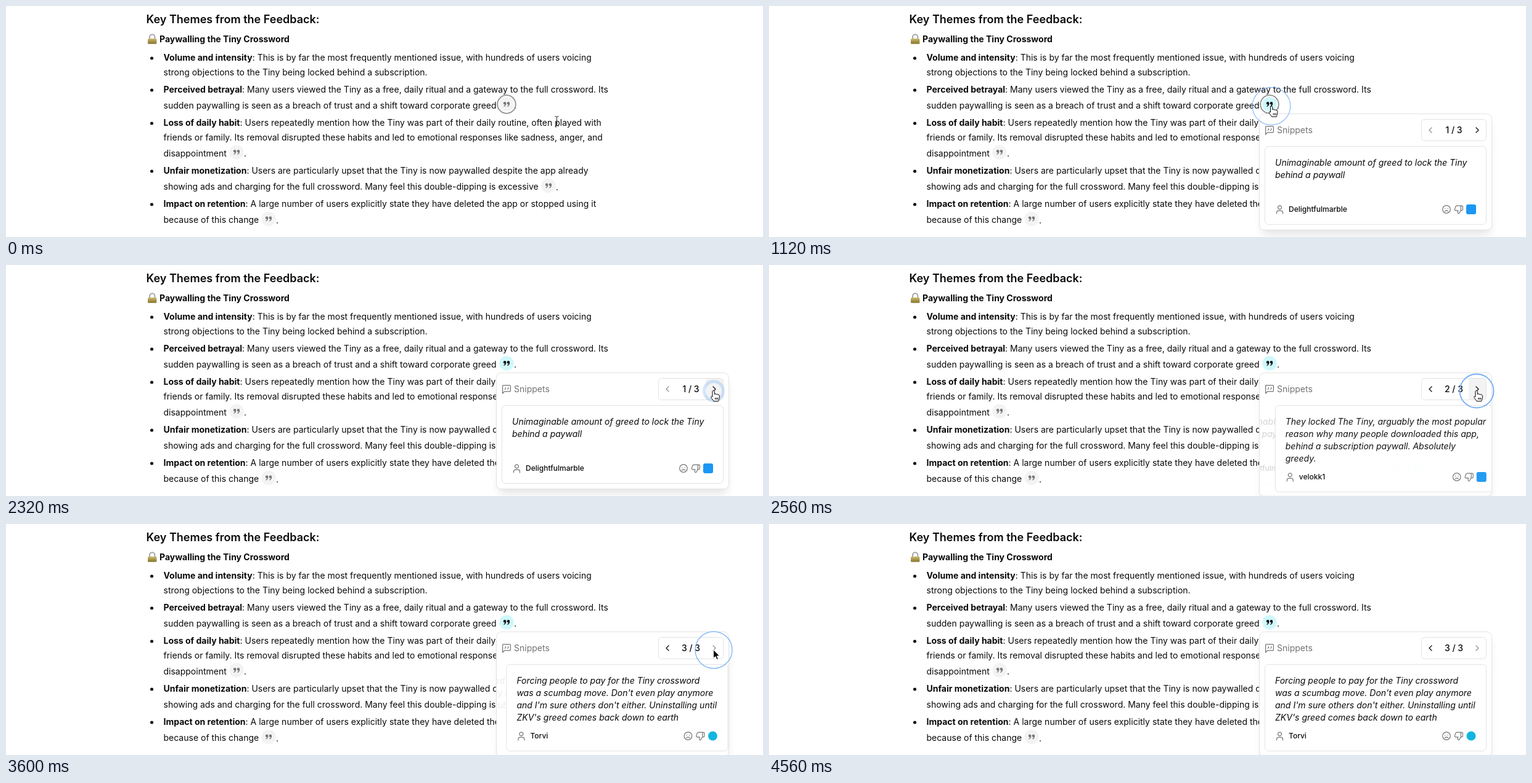
An HTML page for the animation above (5.12 s loop, 1228 by 376 pixels).

```html
<!DOCTYPE html>
<html lang="en">
<head>
<meta charset="utf-8">
<title>Feedback themes</title>
<style>
  html, body { margin: 0; width: 100%; height: 100%; overflow: hidden; background: #fff; }
  svg { display: block; width: 1228px; height: 376px; }
  text { font: 14px Inter, "Liberation Sans", sans-serif; font-optical-sizing: none; fill: #0a0a0a; white-space: pre; }
  .b { font-weight: 700; }
  .h { font-size: 18px; font-weight: 600; }
  .i { font-style: italic; }
  .user { font-size: 12px; font-weight: 500; }
  .page { font-weight: 500; text-anchor: middle; }
  .muted { fill: #737373; }
  .line { fill: none; stroke: #737373; stroke-width: 1.2; stroke-linecap: round; stroke-linejoin: round; }
  .box { fill: #fff; stroke: #e3e3e3; }
  .shadow { opacity: .1; filter: blur(7px); }
  .arrows { fill: none; stroke: #171717; stroke-width: 1.4; stroke-linecap: round; stroke-linejoin: round; }
  #pop { transform-origin: 796px 176px; }
</style>
</head>
<body>
<svg viewBox="0 0 1228 376">
  <defs>
    <linearGradient id="gold" x2="0" y2="1">
      <stop stop-color="#cdbb72"/><stop offset=".5" stop-color="#a8974a"/><stop offset="1" stop-color="#857431"/>
    </linearGradient>
    <path id="mark" d="M-5.2-1.6a2.3 2.3 0 1 1 4.6 0c0 2.6-1.3 4.8-3.6 5.6l-.6-.9c1.3-.6 2-1.5 2.1-2.6a2.3 2.3 0 0 1-2.5-2.1z"/>
    <g id="quote"><use href="#mark"/><use href="#mark" x="5.8"/></g>
    <g id="person" class="line">
      <circle cy="-3.2" r="3"/>
      <path d="M-5 7V5.8C-5 3.4-3.6 2.2-1.6 2.2H1.6C3.6 2.2 5 3.4 5 5.8V7"/>
    </g>
    <g id="face" class="line">
      <circle r="6.3"/>
      <path d="M-2.3-1.6v.3M2.3-1.6v.3M-2.6 3Q0 .9 2.6 3"/>
    </g>
    <path id="thumb" class="line" d="M-3.2-5.8H4.4Q6.4-5.8 6.4-4V.2Q6.4 1.6 5 1.6H3.4L.2 6.8C-1.4 6.8-2 5.6-1.7 4.2L-1.2 1.8H-4.8C-6.2 1.8-6.9.7-6.5-.6L-5.2-4.4Q-4.7-5.8-3.2-5.8M3.4-5.6V1.4"/>
    <clipPath id="inside"><rect id="insideBox" x="796" y="177" width="376"/></clipPath>
  </defs>

  <g id="doc"></g>
  <circle id="focus" cx="812" cy="160" r="14.8" fill="none" stroke="#8f8f8f" stroke-width="1.8"/>

  <g id="pop">
    <rect class="shadow" id="shade" x="799" y="189" width="371" rx="8"/>
    <rect class="box" id="frame" x="795.5" y="175.5" width="377" rx="8"/>
    <g class="line">
      <path d="M805.6 209V196.8Q805.6 195.8 806.6 195.8H817.4Q818.4 195.8 818.4 196.8V204.8Q818.4 205.8 817.4 205.8H808.6Z"/>
      <path d="M810.4 199.4v1.4q0 1.2-1.2 1.6M814.8 199.4v1.4q0 1.2-1.2 1.6"/>
    </g>
    <text class="muted" x="824" y="207">Snippets</text>
    <rect class="box" x="1058.5" y="184.5" width="105" height="35" rx="5"/>
    <path id="hover" d="M1135 185h24q4 0 4 4v26q0 4-4 4h-24z" fill="#f3f3f3"/>
    <g class="arrows">
      <path id="prev" d="M1075 198l-4 4 4 4"/>
      <path id="next" d="M1147 198l4 4-4 4"/>
    </g>
    <text class="page" id="page" x="1111" y="207"></text>
    <g id="cards" clip-path="url(#inside)"></g>
  </g>

  <circle id="ring" fill="none" stroke="#7ab0f7"/>
  <g id="cursor" stroke-linejoin="round">
    <path id="arrow" d="M0 0V14.2L3.3 11.1 5.6 16.2 7.9 15.2 5.7 10.4H10.1Z" stroke="#fff"/>
    <path id="hand" fill="#fff" stroke="#000" d="M-1.6 1.2C-1.6-.4 1.4-.4 1.6 1.2L2 6c.3-1.3 2.6-1.1 2.8.4.6-1 2.5-.8 2.7.6.7-.8 2.3-.3 2.3 1.2v3.5c0 2-1.3 3-1.5 5.5h-8c-.4-2-2.6-3.2-3.9-6-.9-1.6.9-2.8 2.2-1.2zM3.2 11.5v3M5.2 11.5v3M7.2 11.5v3"/>
    <path id="beam" fill="none" stroke="#222" d="M-3-8Q0-8 0-6V6Q0 8-3 8M3-8Q0-8 0-6M0 6Q0 8 3 8M-1.5 3H1.5"/>
  </g>
</svg>

<script>
const LOOP = 5120, STEP = 80;
const $ = id => document.getElementById(id);
const set = (el, attrs) => { for (const k in attrs) el.setAttribute(k, attrs[k]); };
const clamp = v => Math.min(1, Math.max(0, v));
const ease = (t, start, length) => { const p = clamp((t - start) / length); return p * p * (3 - 2 * p); };
const text = (x, y, s, cls = '') => `<text x="${x}" y="${y}" class="${cls}">${s}</text>`;

// Document: [baseline, bold lead, rest of line]
const lines = [
  [89, 'Volume and intensity', ': This is by far the most frequently mentioned issue, with hundreds of users voicing'],
  [113, '', 'strong objections to the Tiny being locked behind a subscription.'],
  [141, 'Perceived betrayal', ': Many users viewed the Tiny as a free, daily ritual and a gateway to the full crossword. Its'],
  [167, '', 'sudden paywalling is seen as a breach of trust and a shift toward corporate greed'],
  [195, 'Loss of daily habit', ': Users repeatedly mention how the Tiny was part of their daily routine, often played with'],
  [219, '', 'friends or family. Its removal disrupted these habits and led to emotional responses like sadness, anger, and'],
  [245, '', 'disappointment'],
  [273, 'Unfair monetization', ': Users are particularly upset that the Tiny is now paywalled despite the app already'],
  [299, '', 'showing ads and charging for the full crossword. Many feel this double-dipping is excessive'],
  [327, 'Impact on retention', ': A large number of users explicitly state they have deleted the app or stopped using it'],
  [353, '', 'because of this change']
];
const chips = [[812, 160], [374, 238], [880, 292.5], [426, 346.5]];

$('doc').innerHTML =
  text(227.5, 28, 'Key Themes from the Feedback:', 'h') +
  '<path d="M233 54V50.5a4.2 4.2 0 0 1 8.4 0V54" fill="none" stroke="#a3a5a8" stroke-width="2"/>' +
  '<rect x="230" y="53" width="14.4" height="8.8" rx="1.6" fill="url(#gold)"/>' +
  text(249, 59, 'Paywalling the Tiny Crossword', 'b') +
  lines.map(([y, lead, rest]) =>
    (lead ? `<circle cx="236.5" cy="${y - 4}" r="2.5"/>` : '') +
    text(255.5, y, `<tspan class="b">${lead}</tspan>${rest}`)).join('') +
  chips.map(([x, y]) =>
    `<g class="chip" transform="translate(${x} ${y})" fill="#777"><circle r="11.7" fill="#f3f3f3"/><use href="#quote"/></g>` +
    text(x + 12, y + 7, '.')).join('');
const chip = document.querySelector('.chip');

const cards = [
  { user: 'Delightfulmarble', bottom: 355.5, badge: 'store',
    quote: ['Unimaginable amount of greed to lock the Tiny', 'behind a paywall'] },
  { user: 'velokk1', bottom: 369.5, badge: 'store',
    quote: ['They locked The Tiny, arguably the most popular', 'reason why many people downloaded this app,', 'behind a subscription paywall. Absolutely', 'greedy.'] },
  { user: 'Torvi', bottom: 369.5, badge: 'play',
    quote: ['Forcing people to pay for the Tiny crossword', "was a scumbag move. Don't even play anymore", "and I'm sure others don't either. Uninstalling until", "ZKV's greed comes back down to earth"] }
];
const badges = {
  store: y => `<rect x="1131" y="${y - 8}" width="16" height="16" rx="3" fill="#1b97f3"/>`,
  play: y => `<circle cx="1139" cy="${y}" r="7.5" fill="#12b5e0"/>`
};
$('cards').innerHTML = cards.map(c => {
  const y = c.bottom - 24.5;
  return `<g><rect class="box" x="804.5" y="228.5" width="359" height="${c.bottom - 228.5}" rx="6"/>` +
    c.quote.map((s, i) => text(821, 260 + i * 20, s, 'i')).join('') +
    `<use href="#person" x="828.5" y="${y}"/>` + text(843, y + 4.3, c.user, 'user') +
    `<use href="#face" x="1099" y="${y}"/><use href="#thumb" x="1119" y="${y}"/>` + badges[c.badge](y) + '</g>';
}).join('');
const cardEls = [...$('cards').children];

// Pointer path: [time, x, y]
const path = [
  [0, 893.5, 187.5], [600, 815, 163], [1320, 815, 163], [1760, 992, 215], [1840, 1016, 216],
  [2160, 1147.5, 204.5], [3880, 1147.5, 204.5], [4400, 686, 353], [4480, 645, 368], [4560, 610, 392]
];
const slope = (i, a) => path[i] && path[i + 1] ? (path[i + 1][a] - path[i][a]) / (path[i + 1][0] - path[i][0]) : 0;
const tangent = (i, a) => {
  const p = slope(i - 1, a), q = slope(i, a);
  return p * q > 0 ? 2 * p * q / (p + q) : 0;
};
function pointer(t, a) {
  let i = 0;
  while (i < path.length - 2 && t > path[i + 1][0]) i++;
  const [p, q] = [path[i], path[i + 1]], d = q[0] - p[0], u = clamp((t - p[0]) / d), v = 1 - u;
  return v * v * ((1 + 2 * u) * p[a] + u * d * tangent(i, a)) +
    u * u * ((1 + 2 * v) * q[a] - v * d * tangent(i + 1, a));
}

const OPEN = 940, SLIDES = [2338, 3350], DURATION = 300;
const clicks = [[805, 815, 163], [2310, 1148, 205], [3300, 1148, 205]];
const overNext = (x, y) => x > 1135 && x < 1164 && y > 184 && y < 220;

function cursorKind(t, x, y) {
  if (t < 1340 && Math.hypot(x - 812, y - 160) < 15) return 'hand';
  if (t > OPEN && x > 796 && x < 1172 && y > 170) {
    if (overNext(x, y)) return t < SLIDES[1] ? 'hand' : 'arrow';
    return x > 821 && x < 1148 && y > 245 && y < 327 ? 'beam' : 'arrow';
  }
  return y < 362 ? 'beam' : 'arrow';
}

function draw(t) {
  const x = pointer(t, 1), y = pointer(t, 2), kind = cursorKind(t, x, y);
  set($('cursor'), { transform: `translate(${x} ${y})` });
  for (const k of ['arrow', 'hand', 'beam']) set($(k), { display: k === kind ? 'inline' : 'none' });

  set(chip, { fill: t >= 640 ? '#0a0a0a' : '#777' });
  set(chip.firstChild, { fill: t >= OPEN ? '#cff8fb' : '#f3f3f3' });
  set($('focus'), { display: t < 2320 ? 'inline' : 'none' });

  const open = ease(t, OPEN, 160);
  $('pop').style.opacity = open;
  $('pop').style.transform = `scale(${.95 + .05 * open})`;

  // Each new card slides in over the fading one
  const moves = SLIDES.map(s => ease(t, s, DURATION));
  const height = 189 + 14 * moves[0];
  set($('frame'), { height });
  set($('shade'), { height: height - 6 });
  set($('insideBox'), { height: height - 2 });
  cardEls.forEach((el, i) => {
    const enter = i ? moves[i - 1] : 1, leave = i < 2 ? moves[i] : 0;
    set(el, {
      transform: `translate(${100 * (1 - enter - leave)} 0)`,
      opacity: clamp(1.15 * enter) * (1 - leave)
    });
  });

  const page = 1 + SLIDES.filter(s => t >= s).length;
  $('page').textContent = `${page} / 3`;
  set($('prev'), { opacity: page > 1 ? 1 : .45 });
  set($('next'), { opacity: page < 3 ? 1 : .45 });
  set($('hover'), { display: page < 3 && overNext(x, y) ? 'inline' : 'none' });

  const click = clicks.find(([s]) => t >= s && t < s + 400);
  set($('ring'), { display: click ? 'inline' : 'none' });
  if (click) {
    const age = t - click[0];
    set($('ring'), {
      cx: click[1], cy: click[2], r: 15 + age * .05,
      'stroke-width': 5 * (1 - age / 400), opacity: clamp(.3 + age / 300)
    });
  }
}

const origin = performance.now();
function tick() {
  const t = (performance.now() - origin) % LOOP;
  draw(Math.floor(t / STEP) * STEP);
  requestAnimationFrame(tick);
}
tick();
</script>
</body>
</html>
```
